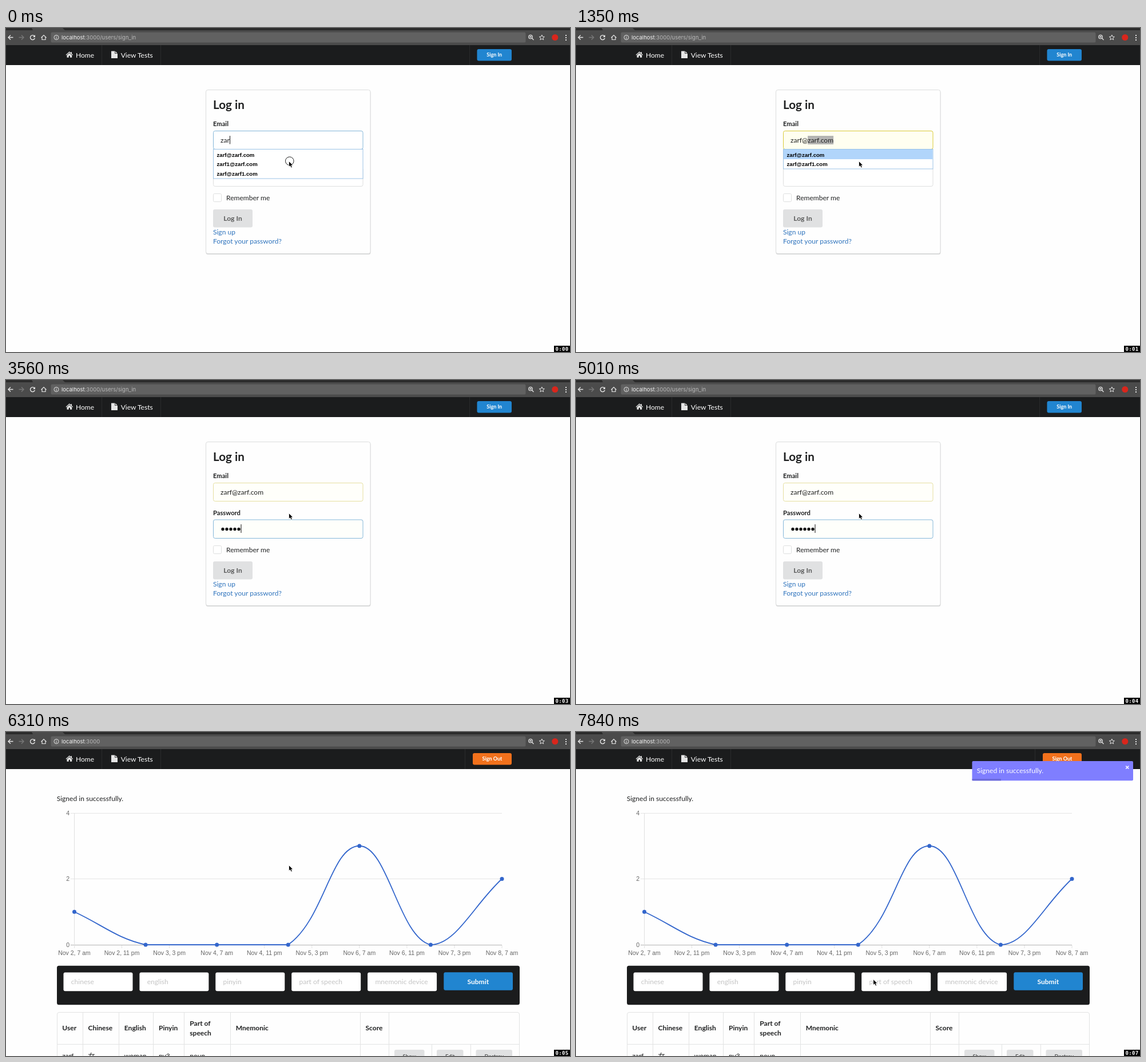
An HTML page for the animation above (7990 ms loop, 986 px wide and 568 px high).

```html
<!DOCTYPE html>
<html lang="en">
<head>
<meta charset="utf-8">
<title>Log in</title>
<style>
html, body { margin: 0; width: 100%; height: 100%; overflow: hidden; background: #fefefe; }
svg { display: block; width: 986px; height: 568px; font: 12.05px Lato, sans-serif; fill: #1f2021; }
text { white-space: pre; }
.b { font-weight: 700; }
.w { fill: #fff; }
.mid { text-anchor: middle; }
.small { font-size: 9px; }
.label { font-size: 11.2px; font-weight: 700; }
.link { fill: #2f74bd; }
.url { font: 9.5px Inter, sans-serif; fill: #b9b9b9; }
.hint { font: 700 9.6px "Liberation Sans", Arial, sans-serif; fill: #000; }
.axis { font: 10.5px "Liberation Sans", Arial, sans-serif; fill: #666; }
.ph { fill: #c4c4c4; }
.field { fill: #fff; stroke: #dedfdf; }
.grey { fill: #e0e1e2; }
.rule { stroke: #e2e3e3; fill: none; }
.icon { fill: none; stroke: #e4e4e4; stroke-width: 1.4; }
.clock { font: 700 9px "DejaVu Sans Mono", monospace; letter-spacing: .35px; fill: #fff; }
</style>
</head>
<body>
<svg viewBox="0 0 986 568">
  <!-- browser bar -->
  <rect width="986" height="30" fill="#4b4b4b"/>
  <rect width="986" height="4" fill="#2b2b2b"/>
  <path d="M45 0H99L103 4H47Z" fill="#4b4b4b"/>
  <rect x="78.5" y="7.5" width="830" height="18" rx="2.5" fill="#616161"/>
  <path class="icon" d="M12.500 16.500H4M8 12.500L4 16.500L8 20.500"/>
  <path class="icon" d="M22.500 16.500H31M27 12.500L31 16.500L27 20.500" style="stroke:#777"/>
  <g id="reload">
    <path class="icon" d="M49.800 14.300A4 4 0 1 0 50.400 17.600"/>
    <path d="M51 12V16H47Z" fill="#e4e4e4"/>
  </g>
  <path id="stop" class="icon" d="M43 13L50 20.500M50 13L43 20.500"/>
  <path class="icon" d="M61.500 17L66 12.500L70.500 17M63 16V20.500H69V16" style="stroke-width:1.2"/>
  <g class="icon" style="stroke-width:1">
    <circle cx="88" cy="16.500" r="4"/>
    <path d="M88 16V19M88 14V15"/>
    <circle cx="917" cy="15.500" r="3.200" style="stroke-width:1.300"/>
    <path d="M919.500 18L922.500 21M915.500 15.500H918.500M917 14V17" style="stroke-width:1.300"/>
    <path d="M936.800 12L938.100 15.100L941.400 15.400L938.900 17.500L939.700 20.700L936.800 19L933.900 20.700L934.700 17.500L932.200 15.400L935.500 15.100Z"/>
  </g>
  <circle cx="959.800" cy="16.500" r="5.500" fill="#d9261c"/>
  <path d="M979 12V22" stroke="#e4e4e4" stroke-width="2" stroke-dasharray="2 2"/>
  <text class="url" x="97" y="20.300"><tspan fill="#f4f4f4">localhost</tspan>:3000<tspan id="path">/users/sign_in</tspan></text>

  <!-- navigation -->
  <rect y="30" width="986" height="35" fill="#1b1c1d"/>
  <path d="M167.500 30V65M270.500 30V65" stroke="#2a2b2c"/>
  <path d="M104.500 47L110.800 41.200L113.500 43.600V42H115V45L117.200 47L116.300 47.800L110.800 43L105.400 47.800ZM106.500 47.800L110.800 44L115.200 47.800V51.700H112V48.700H109.700V51.700H106.500Z" fill="#e6e6e6"/>
  <path d="M184 40.500H190.300V45H195V53H184ZM191.200 40.700L194.800 44.200H191.200Z" fill="#e6e6e6"/>
  <text class="w" x="122" y="52">Home</text>
  <text class="w" x="200.700" y="52">View Tests</text>

  <!-- login page -->
  <g id="login">
    <path d="M810.500 30V65" stroke="#2a2b2c"/>
    <rect x="823.500" y="37" width="60.500" height="20.500" rx="3" fill="#2185d0"/>
    <text class="w b mid small" x="853.700" y="50.300">Sign In</text>
    <rect x="349.500" y="110" width="288" height="287" rx="3.500" fill="#d3d4d5"/>
    <rect x="349.500" y="108.500" width="287.500" height="287" rx="3.500" fill="#fefefe" stroke="#dcdddd"/>
    <text class="b" x="362" y="142" style="font-size:20.660px">Log in</text>
    <text class="label" x="362" y="172">Email</text>
    <text class="label" x="362" y="236.700">Password</text>
    <rect id="mailBox" class="field" x="362.500" y="180.500" width="261.500" height="32" rx="3"/>
    <rect id="passBox" class="field" x="362.500" y="245" width="261.500" height="32.500" rx="3"/>
    <rect id="sel" y="189" height="15" fill="#b4b4b2"/>
    <text id="mail" x="375" y="200.500"></text>
    <rect id="mailCaret" y="189" width="1" height="14.500" fill="#111"/>
    <g id="dots"></g>
    <rect id="passCaret" y="253" width="1" height="15" fill="#111"/>
    <g id="list">
      <rect id="listBox" x="362.500" y="212.500" width="261.500" fill="#fff" stroke="#9cc3e6"/>
      <rect id="pick" x="363" y="213" width="260.500" height="17" fill="#b1d5fb"/>
      <text class="hint" x="368.500" y="225.500">zarf@zarf.com</text>
      <text class="hint" id="row2" x="368.500" y="242"></text>
      <text class="hint" id="row3" x="368.500" y="258.700">zarf@zarf1.com</text>
    </g>
    <rect class="field" x="362.500" y="290.500" width="14" height="14" rx="2"/>
    <text x="385" y="302">Remember me</text>
    <rect class="grey" x="362" y="318" width="69" height="31.500" rx="3"/>
    <text class="b mid" x="396.500" y="338.200" fill="#5a5b5b">Log In</text>
    <text class="link" x="362" y="361.500">Sign up</text>
    <text class="link" x="362" y="378.300">Forgot your password?</text>
  </g>

  <!-- dashboard -->
  <g id="home">
    <path d="M802.500 30V65" stroke="#2a2b2c"/>
    <rect x="816" y="37" width="68" height="20.500" rx="3" fill="#f2711c"/>
    <text class="w b mid small" x="850" y="50.300">Sign Out</text>
    <text x="88.700" y="120.600">Signed in successfully.</text>
    <g id="chart"></g>
    <rect x="89" y="409.800" width="809" height="68.500" rx="3.500" fill="#1b1c1d"/>
    <g id="inputs"></g>
    <rect x="765.300" y="421.300" width="120.700" height="31.500" rx="3" fill="#2185d0"/>
    <text class="w b mid" x="825.300" y="441.500">Submit</text>
    <path class="rule" d="M89.500 568V495Q89.500 491.500 93 491.500H894Q897.500 491.500 897.500 495V568M89 547.500H898M134.500 491V568M197.500 491V568M257.500 491V568M311.500 491V568M392.500 491V568M619.500 491V568M669.500 491V568M744.500 547V568M812.500 547V568"/>
    <g id="table"></g>
    <g id="toast">
      <rect x="692.500" y="51" width="281.500" height="34.300" rx="2" fill="#7f7eff"/>
      <rect id="bar" x="692.500" y="82.300" height="3" fill="#6a69d8"/>
      <text class="w" x="700.700" y="72.400">Signed in successfully.</text>
      <path d="M961.300 59.500L966.300 64.500M966.300 59.500L961.300 64.500" stroke="#fff" stroke-width="1.700"/>
    </g>
  </g>

  <circle id="ring" cx="495.800" cy="233.200" r="7.300" fill="none" stroke="#222"/>
  <path id="cursor" d="M0 0V10L2.300 8L4 11.600L5.900 10.700L4.300 7.300H7.300Z" fill="#000" stroke="#fff" stroke-width=".8"/>
  <rect x="958" y="557" width="28" height="11" fill="#000"/>
  <text class="clock" x="960.500" y="565.500">0:0<tspan id="sec"></tspan></text>
</svg>
<script>
const LOOP = 7990;
const $ = id => document.getElementById(id);

function add(parent, tag, attrs, text) {
  const el = document.createElementNS("http://www.w3.org/2000/svg", tag);
  for (const k in attrs) el.setAttribute(k, attrs[k]);
  if (text !== undefined) el.textContent = text;
  return $(parent).appendChild(el);
}
const set = (id, attrs) => { for (const k in attrs) $(id).setAttribute(k, attrs[k]); };
const show = (id, on) => { $(id).style.display = on ? "" : "none"; };

// Spline with tension; control points stay inside the plot area
function drawChart() {
  const left = 119.5, right = 867, top = 142, base = 373, tension = .4;
  const yOf = v => base - v * (base - top) / 4;
  const pts = [1, 0, 0, 0, 3, 0, 2].map((v, i) => ({ x: left + i * (right - left) / 6, y: yOf(v) }));
  const clamp = y => Math.min(base, Math.max(top, y));
  const dist = (a, b) => Math.hypot(a.x - b.x, a.y - b.y);
  const ctrl = pts.map((p, i) => {
    const a = pts[i - 1] || p, c = pts[i + 1] || p;
    const d1 = dist(a, p), d2 = dist(p, c);
    const f1 = tension * d1 / (d1 + d2), f2 = tension * d2 / (d1 + d2);
    const dx = c.x - a.x, dy = c.y - a.y;
    return [p.x - f1 * dx, clamp(p.y - f1 * dy), p.x + f2 * dx, clamp(p.y + f2 * dy)];
  });

  for (const v of [4, 2, 0]) {
    const y = Math.floor(yOf(v)) + .5;
    add("chart", "path", { d: `M113 ${y}H${right}`, stroke: v ? "#e5e5e5" : "#b4b4b4" });
    add("chart", "text", { class: "axis", x: 111, y: yOf(v) + 3.7, "text-anchor": "end" }, v);
  }
  add("chart", "path", { d: `M${left} ${top}V379`, stroke: "#e0e0e0" });
  const times = ["7 am", "11 pm", "3 pm"];
  for (let i = 0; i < 10; i++) {
    const x = left + i * (right - left) / 9;
    const day = 2 + Math.floor(i * 2 / 3);
    add("chart", "path", { d: `M${x} 374V379`, stroke: "#e0e0e0" });
    add("chart", "text", { class: "axis mid", x, y: 391.2 }, `Nov ${day}, ${times[i % 3]}`);
  }
  let d = `M${pts[0].x} ${pts[0].y}`;
  for (let i = 1; i < pts.length; i++) {
    const [, , ax, ay] = ctrl[i - 1], [bx, by] = ctrl[i];
    d += `C${ax} ${ay} ${bx} ${by} ${pts[i].x} ${pts[i].y}`;
  }
  add("chart", "path", { d, fill: "none", stroke: "#3366cc", "stroke-width": 1.8 });
  for (const p of pts) add("chart", "circle", { cx: p.x, cy: p.y, r: 3.5, fill: "#3366cc" });
}

function drawTable() {
  ["chinese", "english", "pinyin", "part of speech", "mnemonic device"].forEach((name, i) => {
    const x = 100.5 + i * 132.9;
    add("inputs", "rect", { class: "w", x, y: 421.5, width: 121, height: 32.7, rx: 3 });
    add("inputs", "text", { class: "ph", x: x + 13.3, y: 442.3 }, name);
  });
  const cols = [[98.3, "User", "zarf"], [143.5, "Chinese", "女"], [206.8, "English", "woman"],
    [267, "Pinyin", "nv3"], [321.3, "Part of", "noun"], [401.7, "Mnemonic", ""], [628.5, "Score", ""]];
  cols.forEach(([x, head, cell], i) => {
    add("table", "text", { class: "b", x, y: i === 4 ? 514.8 : 523.3 }, head);
    add("table", "text", { x, y: 572 }, cell);
  });
  add("table", "text", { class: "b", x: 321.3, y: 531.6 }, "speech");
  for (const [x, width, name] of [[679, 52.5, "Show"], [753, 46.5, "Edit"], [821.5, 63.5, "Destroy"]]) {
    add("table", "rect", { class: "grey", x, y: 557, width, height: 24, rx: 3 });
    add("table", "text", { class: "b mid", x: x + width / 2, y: 572.2, fill: "#5a5b5b", style: "font-size:9.5px" }, name);
  }
}

// Value of the last [time, value] pair already reached
const at = (t, keys) => keys.reduce((v, k) => t >= k[0] ? k[1] : v, keys[0][1]);
const count = (t, times) => times.filter(x => t >= x).length;

const seconds = [990, 2140, 3110, 4110, 5160, 6490, 7390];
const keyPresses = [2650, 2800, 2950, 3260, 3560, 5010, 5160, 5260, 5410, 5560];
const typed = [[0, "zar"], [150, "zarf"], [410, "zarf@"], [1350, "zarf@zarf.com"]];
const mailCaret = [[0, true], [890, false]];
const passCaret = [[0, false], [1530, true], [2040, false], [2650, true], [4010, false],
  [4410, true], [4710, false], [5010, true]];
const pointer = [[0, [494.5, 233.5]], [6670, [510, 262]], [6850, [524.5, 294.5]], [7000, [440, 190]],
  [7210, [254, 45]], [7390, [300, 130]], [7540, [390, 270]], [7690, [470, 370]], [7840, [519.7, 433.5]]];
const toastAlpha = [[0, 0], [6490, .3], [6670, .8], [6850, 1]];
const barWidth = [[0, 281.5], [7000, 241], [7210, 192], [7390, 151], [7540, 118], [7690, 84], [7840, 50.5]];

function render(t) {
  const picked = t >= 1350, onPass = t >= 1530, home = t >= 6310;
  show("login", !home);
  show("home", home);
  show("path", t < 6010);
  const loading = t >= 5710 && !home;
  show("stop", loading);
  show("reload", !loading);

  if (!home) {
    $("mail").textContent = at(t, typed);
    const selecting = picked && !onPass;
    show("sel", selecting);
    if (selecting) {
      const from = $("mail").getSubStringLength(0, 5);
      set("sel", { x: 375 + from, width: $("mail").getComputedTextLength() - from });
    }
    show("mailCaret", at(t, mailCaret));
    set("mailCaret", { x: Math.round(375 + $("mail").getComputedTextLength()) });
    $("mailBox").style.fill = onPass ? "#fffffa" : picked ? "#fffff0" : "#fff";
    $("mailBox").style.stroke = onPass ? "#e5dfa1" : picked ? "#d9ca38" : "#85b7d9";
    $("passBox").style.fill = onPass ? "#fefffb" : "#fff";
    $("passBox").style.stroke = onPass ? "#85b7d9" : "#dedfdf";

    const short = t >= 410;
    show("list", !onPass);
    show("pick", picked);
    show("row3", !short);
    $("row2").textContent = short ? "zarf@zarf1.com" : "zarf1@zarf.com";
    set("listBox", { height: short ? 34.5 : 51.5 });

    const n = count(t, keyPresses);
    [...$("dots").children].forEach((dot, i) => { dot.style.display = i < n ? "" : "none"; });
    show("passCaret", at(t, passCaret));
    set("passCaret", { x: 375.5 + 7 * n });
  }

  $("toast").style.opacity = at(t, toastAlpha);
  set("bar", { width: at(t, barWidth) });
  show("ring", t < 150);
  set("cursor", { transform: `translate(${at(t, pointer)})` });
  $("sec").textContent = count(t, seconds);
}

drawChart();
drawTable();
for (let i = 0; i < 10; i++) add("dots", "circle", { cx: 379 + 7 * i, cy: 261.5, r: 2.7, fill: "#111" });

function frame() {
  render(performance.now() % LOOP);
  requestAnimationFrame(frame);
}
frame();
</script>
</body>
</html>
```
